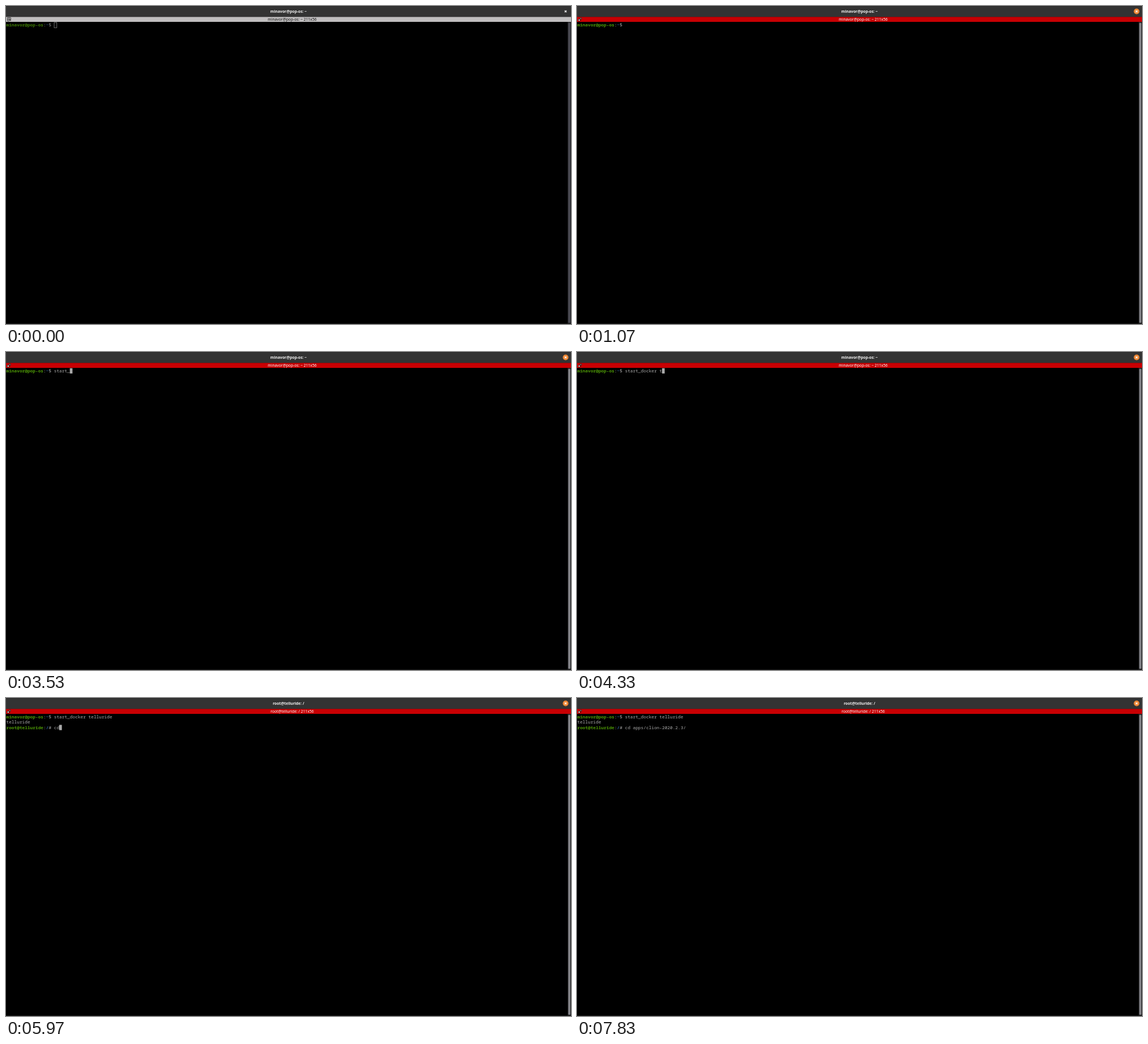
These frames come from a looping animation (998 by 561 pixels, 8 s). An HTML page:

```html
<!DOCTYPE html>
<html lang="en">
<head>
<meta charset="utf-8">
<title>Terminal</title>
<style>
  html, body { margin: 0; width: 100%; height: 100%; overflow: hidden; background: #000; }
  svg { display: block; width: 998px; height: 561px; }
  text { white-space: pre; }
  .mono { font: 7.8px "Noto Sans Mono", "DejaVu Sans Mono", monospace; fill: #aaa; }
  .sans { font: 6.75px "Noto Sans", "Open Sans", sans-serif; text-anchor: middle; }
  .bold { font-weight: 700; }
  .user { font-weight: 700; fill: #4e9a06; }
  .path { font-weight: 700; fill: #3465a4; }
</style>
</head>
<body>
<svg viewBox="0 0 998 561">
  <rect width="998" height="561"/>
  <rect width="998" height="19.5" fill="#333"/>
  <rect width="998" height="1" fill="#292929"/>
  <text id="title" class="sans bold" x="499" y="11.9" fill="#f2f2f2"></text>
  <circle id="closeDisc" cx="988.5" cy="9.5" r="5" fill="#ee8734"/>
  <path d="M986.8 7.8l3.4 3.4m0-3.4l-3.4 3.4" stroke="#fff" stroke-width="1.2"/>

  <rect id="bar" y="19.3" width="998" height="8.7"/>
  <text id="tab" class="sans" x="505.5" y="26"></text>
  <g id="idleIcon" fill="none" stroke="#222" stroke-width=".8">
    <path d="M2.4 20.6h6v3.2M2.4 20.6v5.8h3.4M2.4 23.5h6M5.4 20.6v5.8M6.4 25.2h2.6m-1.3-1.3v2.6"/>
  </g>
  <g id="activeIcon">
    <rect x="2" y="23" width="3.4" height="3.4" fill="#222"/>
    <rect x="2.8" y="23.8" width="2" height="2" fill="#fff"/>
    <rect x="5.4" y="20.6" width="3" height="3" fill="#222"/>
    <rect x="6" y="21.3" width="1.4" height="1.4" fill="#b99"/>
    <rect x="5.8" y="24.6" width="1.8" height="1.4" fill="#511"/>
  </g>

  <rect x="992" y="28" width="6" height="533" fill="#242426"/>
  <rect id="slider" x="993.3" y="29.5" width="3.4" height="529.5" rx="1.7"/>
  <rect y="560" width="998" height="1" fill="#1c1c1c"/>

  <g id="screen">
    <rect id="caret" width="4.7" height="9.3"/>
    <text class="mono" x=".5" y="35.8"><tspan id="user" class="user"></tspan>:<tspan class="path">~</tspan>$ <tspan id="command"></tspan></text>
    <text id="output" class="mono" x=".5" y="45.2">telluride</text>
    <text id="rootLine" class="mono" x=".5" y="54.6"><tspan class="user">root@telluride</tspan>:<tspan class="path">/</tspan># <tspan id="rootCommand"></tspan></text>
  </g>
  <g id="pointer" fill="none">
    <path d="M-2-4Q0-4 0-3Q0-4 2-4M0-3V3M-2 4Q0 4 0 3Q0 4 2 4" stroke="#000" stroke-width="2"/>
    <path d="M-2-4Q0-4 0-3Q0-4 2-4M0-3V3M-2 4Q0 4 0 3Q0 4 2 4" stroke="#eee"/>
  </g>
</svg>
<script>
const LOOP = 8000, CELL = 4.68, ROW = 9.4, PROMPT = 18;
const FOCUS = 370, ENTER = 5000, OUTPUT = 5070, ROOT = 5270, RETITLE = 5300;
const HOST = 'minavor@pop-os';
const el = Object.fromEntries([...document.querySelectorAll('[id]')].map(n => [n.id, n]));

// Each entry: time of the key press, characters present afterwards.
const COMMAND = 'start_docker telluride ';
const commandKeys = [[2300, 1], [2430, 2], [2530, 3], [2670, 4], [2870, 5], [3530, 6],
  [3700, 7], [3830, 8], [3970, 13], [4330, 14], [4430, 15], [4600, 16], [4670, 17],
  [4730, 18], [4800, 23]];
const ROOT_COMMAND = 'cd apps/clion-2020.2.3/';
const rootKeys = [[5870, 1], [5970, 2], [6100, 3], [6270, 4], [6430, 5], [6630, 8],
  [6930, 9], [7130, 10], [7300, 23]];
const blinkOff = [[970, 1570], [2170, 2300], [7830, LOOP]];
const pointerPath = [[110, 0, 190], [250, 215, 112], [370, 326.5, 84.5], [430, 326.5, 84.5],
  [570, 215, 112], [770, 0, 190]];

const typed = (keys, t) => keys.reduce((n, [at, count]) => t >= at ? count : n, 0);
const show = (node, on) => node.setAttribute('visibility', on ? 'visible' : 'hidden');
const set = (node, attrs) => { for (const k in attrs) node.setAttribute(k, attrs[k]); };
const setText = (node, s) => { if (node.textContent !== s) node.textContent = s; };

function drawPointer(t) {
  const i = pointerPath.findIndex(([at], n) => n && t < at);
  const visible = i > 0 && t >= pointerPath[0][0];
  show(el.pointer, visible);
  if (!visible) return;
  const [t0, x0, y0] = pointerPath[i - 1], [t1, x1, y1] = pointerPath[i];
  const k = (t - t0) / (t1 - t0);
  el.pointer.setAttribute('transform', `translate(${x0 + (x1 - x0) * k} ${y0 + (y1 - y0) * k})`);
}

function drawCaret(t, focused, count, rootCount) {
  let row = 0, column = PROMPT + count;
  if (t >= ROOT) [row, column] = [2, PROMPT + rootCount];
  else if (t >= OUTPUT) [row, column] = [2, 0];
  else if (t >= ENTER) [row, column] = [1, 0];
  const inset = focused ? 0 : .4;
  set(el.caret, {
    x: .4 + column * CELL + inset, y: 28.6 + row * ROW + inset,
    fill: focused ? '#aaa' : 'none', stroke: focused ? 'none' : '#aaa', 'stroke-width': .8
  });
  show(el.caret, !blinkOff.some(([from, to]) => t >= from && t < to));
}

function draw(t) {
  const focused = t >= FOCUS;
  const title = t >= RETITLE ? 'root@telluride: /' : HOST + ': ~';
  setText(el.title, title);
  setText(el.tab, title + ' 211x56');
  set(el.tab, { fill: focused ? '#fff' : '#111' });
  set(el.bar, { fill: focused ? '#c80003' : '#c0bebf' });
  set(el.slider, { fill: focused ? '#8b8b90' : '#4c4c55' });
  set(el.screen, { opacity: focused ? 1 : .8 });
  show(el.closeDisc, focused);
  show(el.activeIcon, focused);
  show(el.idleIcon, !focused);

  const count = typed(commandKeys, t), rootCount = typed(rootKeys, t);
  setText(el.user, HOST);
  setText(el.command, COMMAND.slice(0, count));
  setText(el.rootCommand, ROOT_COMMAND.slice(0, rootCount));
  show(el.output, t >= OUTPUT);
  show(el.rootLine, t >= ROOT);
  drawCaret(t, focused, count, rootCount);
  drawPointer(t);
}

const start = performance.now();
function tick() {
  draw((performance.now() - start) % LOOP);
  requestAnimationFrame(tick);
}
tick();
</script>
</body>
</html>
```
